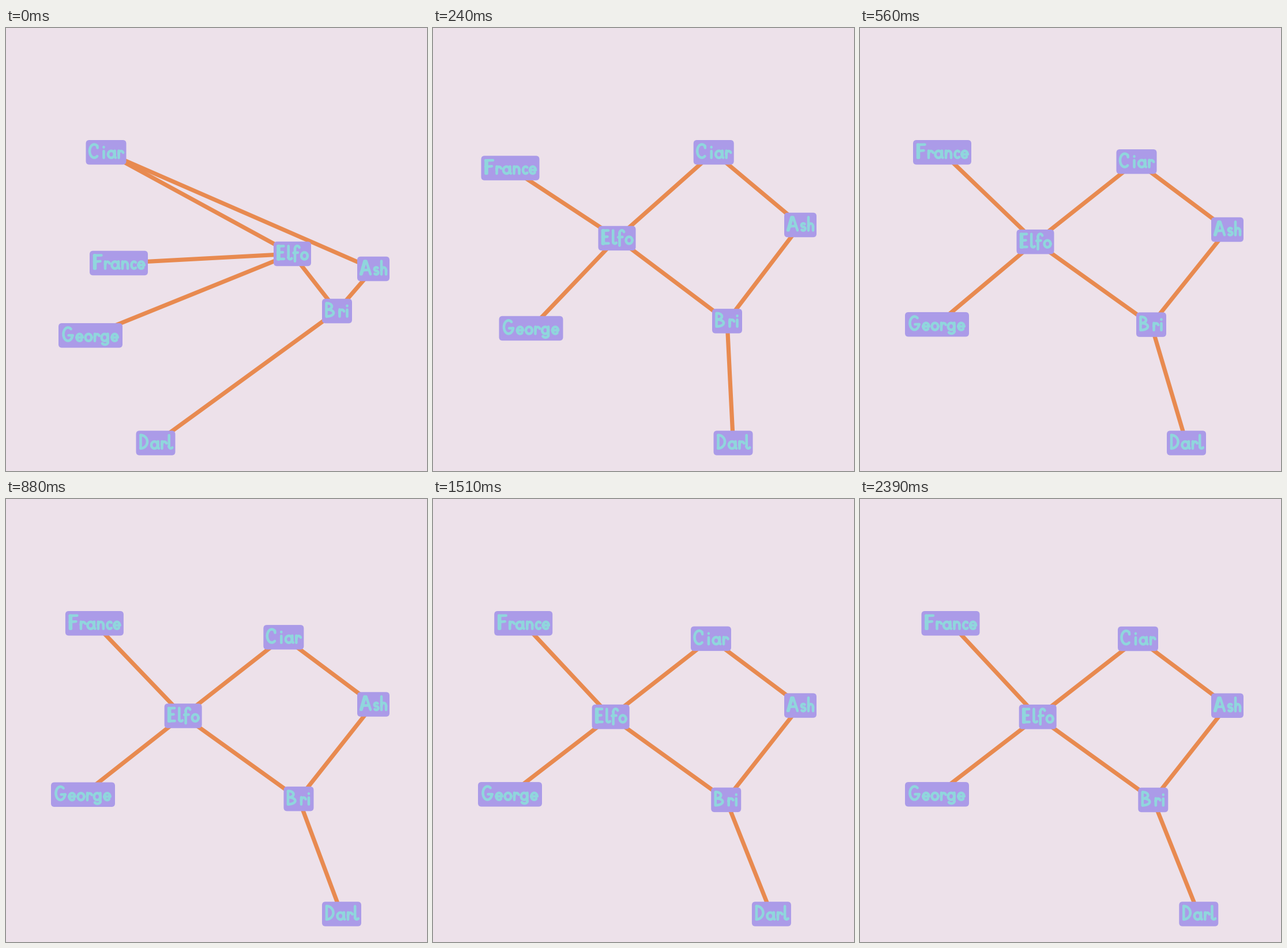
Animation, 730 px wide and 767 px high, one loop 2.44 s. Source, as a matplotlib script:

```python
import numpy as np
import matplotlib.pyplot as plt
from matplotlib.animation import FuncAnimation
from matplotlib.patches import FancyBboxPatch, PathPatch
from matplotlib.path import Path
from matplotlib.transforms import Affine2D

W, H, DPI = 730, 767, 100
LOOP, TICK = 2440, 10
PX = 72 / DPI
BG, EDGE, BOX, INK = "#ede1ea", "#e88a50", "#ab9be8", "#90d6dd"
BOX_H = 42.5
LEFT, RIGHT, TOP, BOTTOM = 78, 665, 194, 739.8


def line(*pts):
    return np.array(pts, float)


def arc(cx, cy, rx, ry, a, b):
    t = np.radians(np.linspace(a, b, 30))
    return np.column_stack([cx + rx * np.cos(t), cy + ry * np.sin(t)])


def stem(x, top=14.5, bottom=2.3):
    return line((x, top), (x, bottom))


def bowl(cx, rx, a=0, b=360):
    return arc(cx, 8.3, rx, 6, a, b)


# Each glyph: advance width, then its pen strokes (y up from the baseline).
CAPS = {
    "A": (24, line((3, 2.5), (9.5, 25.3), (12.5, 25.3), (20, 2.5)),
          line((4.5, 2.5), (11, 24)), line((6, 9.5), (17, 10))),
    "B": (24, stem(4, 25.3), arc(5, 19.8, 8.5, 5.5, -90, 90),
          arc(5, 8.5, 11.5, 6, -90, 90)),
    "C": (23, arc(10.5, 14, 8, 11.5, 50, 310), line((15.6, 22.8), (16.2, 19.5))),
    "D": (20, stem(4, 25.3), arc(4, 14, 11.5, 11.5, -90, 90)),
    "E": (19, stem(4, 25.3), stem(6, 25), line((4, 25), (14, 25.3)),
          line((4, 14), (12.5, 14.5)), line((4, 2.8), (14.5, 3))),
    "F": (20, stem(4, 25.3), stem(6, 25), line((4, 25), (16.5, 25.3)),
          line((4, 14), (14.5, 15))),
    "G": (23, arc(10.5, 14, 8, 11.5, 50, 350), line((11.5, 12), (18.6, 12))),
}
SMALL = {
    "a": (18, bowl(8, 5.5), line((14, 14.5), (14, 4.5), (15.5, 2.5))),
    "c": (12, bowl(7, 4.5, 50, 310)),
    "e": (15, bowl(7.5, 5, 0, 315), line((2.5, 8.3), (12.5, 8.3))),
    "f": (13, arc(8.5, 20.5, 4, 5, 25, 180), stem(4.5, 20.5, -1),
          line((2, 13.5), (9.5, 14))),
    "g": (18, bowl(8, 5.3), stem(13.5, 14.5, -0.5), arc(8.5, -0.5, 5, 3.5, 0, -155)),
    "h": (14, stem(3, 25.3), arc(7, 8.8, 4, 5.4, 180, 0), stem(11, 8.8)),
    "i": (9, stem(4, 14), stem(4, 21, 20.5)),
    "l": (10, stem(3.2, 25.3, 5.5), arc(6.2, 5.5, 3, 3, 180, 330)),
    "n": (16, stem(3), arc(7.5, 8.8, 4.5, 5.4, 180, 0), stem(12, 8.8)),
    "o": (16, bowl(8, 5.4)),
    "r": (12, stem(3), arc(7, 9.2, 4, 4.8, 180, 25)),
    "s": (12, arc(6, 11.4, 3.2, 3, 40, 265), arc(6, 5.3, 3.4, 3.1, 90, -140)),
}
GLYPHS = {**CAPS, **SMALL}

WIDTHS = {"Ash": 56, "Bri": 52, "Ciar": 70, "Darl": 68,
          "Elfo": 65, "France": 101, "George": 111}
NAMES = list(WIDTHS)
LINKS = ["AB", "AC", "BD", "BE", "CE", "EF", "EG"]

# Layouts at the start, after the swing, after the settle, and at rest.
POSES = np.array([
    [(637, 417), (574, 490), (173.5, 215), (259.5, 718.5),
     (496.5, 391), (195.5, 407), (146.5, 532.3)],
    [(637, 341), (510, 507.4), (486.7, 215), (520.5, 718.5),
     (319, 364), (134, 242.5), (170, 520)],
    [(637, 349), (505, 513.6), (479.5, 231.3), (566, 718.5),
     (304, 370.2), (142.5, 209), (128, 513.2)],
    [(637, 357.7), (508.3, 521), (482, 242), (587.3, 718.5),
     (308.2, 377.2), (157, 212), (130, 511.3)],
])
HALF = np.array([(w / 2, BOX_H / 2) for w in WIDTHS.values()])
SWING, SETTLE = 6, 14


def ease(u, k):
    return (1 - np.exp(-k * u)) / (1 - np.exp(-k))


def layout(step):
    start, swung, settled, rest = POSES
    if step <= SWING:
        p = start + (swung - start) * ease(step / SWING, 2)
    elif step <= SETTLE:
        u = (step - SWING) / (SETTLE - SWING)
        p = swung + (settled - swung) * ease(u, 1.2)
    else:
        p = rest + (settled - rest) * 0.25 ** ((step - SETTLE) / 8)
    return np.clip(p, (LEFT, TOP) + HALF, (RIGHT, BOTTOM) - HALF)


def step_at(ms):
    # Solver steps come in uneven pairs, two per 80 ms.
    gap = 30 if ms < 880 else 50
    return 2 * (ms // 80) + (ms % 80 >= gap)


def word_path(word):
    x = -sum(GLYPHS[ch][0] for ch in word) / 2
    paths = []
    for ch in word:
        advance, *strokes = GLYPHS[ch]
        for s in strokes:
            paths.append(Path(np.column_stack([x + s[:, 0], 11.8 - s[:, 1]])))
        x += advance
    return Path.make_compound_path(*paths)


fig = plt.figure(figsize=(W / DPI, H / DPI), dpi=DPI, facecolor=BG)
ax = fig.add_axes([0, 0, 1, 1])
ax.set_xlim(0, W)
ax.set_ylim(H, 0)
ax.axis("off")

index = {name[0]: i for i, name in enumerate(NAMES)}
pairs = [(index[a], index[b]) for a, b in LINKS]
edges = [ax.plot([], [], color=EDGE, lw=7.2 * PX, zorder=1)[0] for _ in pairs]

shifts = []
for i, (name, w) in enumerate(WIDTHS.items()):
    shift = Affine2D()
    place = shift + ax.transData
    box = FancyBboxPatch((-w / 2, -BOX_H / 2), w, BOX_H,
                         boxstyle="round,pad=0,rounding_size=6",
                         fc=BOX, ec="none", transform=place, zorder=2 + i)
    text = PathPatch(word_path(name), fc="none", ec=INK, lw=4.6 * PX,
                     capstyle="round", joinstyle="round",
                     transform=place, zorder=2.5 + i)
    ax.add_artist(box)
    ax.add_artist(text)
    shifts.append(shift)


def draw(frame):
    pos = layout(step_at(frame * TICK))
    for edge, (a, b) in zip(edges, pairs):
        edge.set_data(pos[[a, b], 0], pos[[a, b], 1])
    for shift, (x, y) in zip(shifts, pos):
        shift.clear().translate(x, y)
    return edges


anim = FuncAnimation(fig, draw, frames=LOOP // TICK, interval=TICK,
                     repeat=True, repeat_delay=0, blit=False)
plt.show()
```
